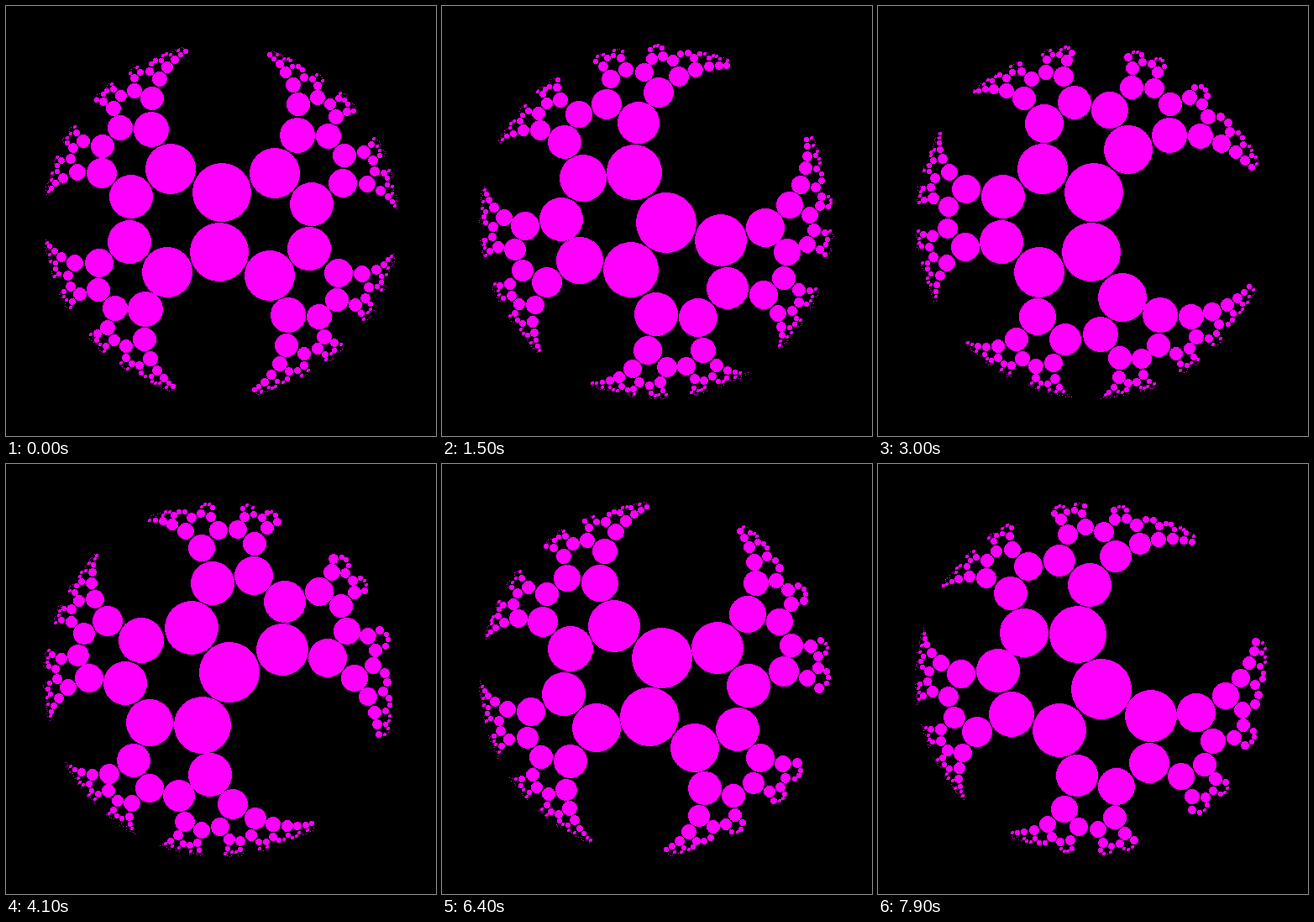
Write an HTML page that moves like this. It is 512 by 512 pixels and loops after 8 s.

```html
<!DOCTYPE html>
<html lang="en">
<head>
<meta charset="utf-8">
<title>Modular group circles</title>
<style>
  html, body { margin: 0; width: 100%; height: 100%; overflow: hidden; background: #000; }
  svg { display: block; width: 100vw; height: 100vh; }
</style>
</head>
<body>
<svg viewBox="0 0 512 512" shape-rendering="crispEdges">
  <rect width="512" height="512" fill="#000"/>
  <path id="dots" fill="#f0f"/>
</svg>
<script>
const LOOP = 8000, STEP = 100, DEGREES_PER_STEP = 2;
const CENTER = 256, DISK = 215, MAX_ENTRY = 8;
const PIVOT = Math.sqrt(3) - 2;            // order-3 fixed point in the disk
const SPREAD = 3 - 2 * Math.SQRT2;         // tanh of half the hyperbolic radius

const mul = ([a, b], [c, d]) => [a * c - b * d, a * d + b * c];
const div = ([a, b], [c, d]) => {
  const n = c * c + d * d;
  return [(a * c + b * d) / n, (b * c - a * d) / n];
};

// Disk isometry that takes p (on the real axis) to the origin.
const recenter = ([x, y], p) => div([x - p, y], [1 - p * x, -p * y]);

// Image of i*sqrt(2) under (az+b)/(cz+d), carried from the half-plane to the disk.
function orbitPoint(a, b, c, d) {
  const h = Math.SQRT2;
  return mul([0, -1], div([c * h + b, a * h - d], [b - c * h, a * h + d]));
}

function buildOrbit() {
  const points = [], n = MAX_ENTRY;
  for (let c = 0; c <= n; c++)
    for (let d = -n; d <= n; d++) {
      if (c === 0 && d <= 0) continue;     // one matrix of each pair +M, -M
      for (let a = -n; a <= n; a++)
        for (let b = -n; b <= n; b++)
          if (a * d - b * c === 1) points.push(recenter(orbitPoint(a, b, c, d), PIVOT));
    }
  return points;
}

// Circles snap to whole pixels; the smallest become one pixel, then vanish.
function circlePath(w) {
  const q = w[0] * w[0] + w[1] * w[1], t2 = SPREAD * SPREAD;
  const k = DISK / (1 - t2 * q);
  const r = Math.floor(k * SPREAD * (1 - q));
  if (r < 1) return "";
  const [x, y] = w.map(v => Math.floor(CENTER + v * k * (1 - t2)));
  if (r === 1) return `M${x} ${y}h1v1h-1z`;
  return `M${x - r} ${y}a${r} ${r} 0 1 1 ${2 * r} 0a${r} ${r} 0 1 1 ${-2 * r} 0z`;
}

const orbit = buildOrbit();
const dots = document.getElementById("dots");
let shown = -1;

function draw(time) {
  const step = Math.floor((time % LOOP) / STEP);
  if (step === shown) return;
  shown = step;
  const angle = (step + 1) * DEGREES_PER_STEP * Math.PI / 180;
  const turn = [Math.cos(angle), Math.sin(angle)];
  dots.setAttribute("d", orbit.map(p => circlePath(recenter(mul(p, turn), -PIVOT))).join(""));
}

const start = performance.now();
function tick() {
  draw(performance.now() - start);
  requestAnimationFrame(tick);
}
tick();
</script>
</body>
</html>
```
